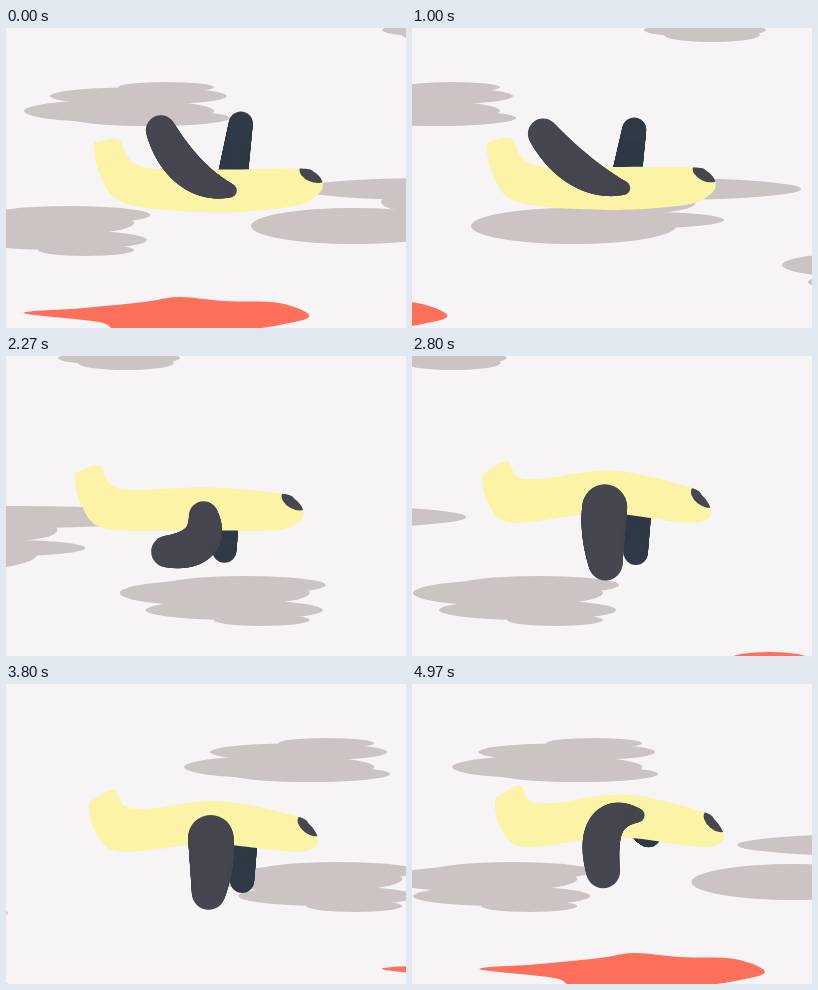
Animation, 400 px wide and 300 px high, one loop 5010 ms. Source, as an HTML page with a canvas:

```html
<!DOCTYPE html>
<html lang="en">
<head>
<meta charset="utf-8">
<title>Flying</title>
<style>
  html, body { margin: 0; width: 100%; height: 100%; overflow: hidden; background: #f6f4f4; }
  canvas { display: block; }
</style>
</head>
<body>
<canvas id="stage" width="400" height="300"></canvas>
<script>
const ctx = document.getElementById('stage').getContext('2d');
const LOOP = 5010, CYCLE = 102.7, FLAP = 10.1, TAU = 2 * Math.PI;
const SKY = '#f6f4f4', CLOUD = '#cbc4c3', RED = '#ff705c';
const YELLOW = '#fbf3a6', DARK = '#45464f', SHADE = '#2f3a46';

// Clouds: streaks of [left, right, middle y, half height]
const layered = [[0, 190, 17, 13], [45, 206, 9, 9], [26, 203, 34, 10], [94, 190, 44, 6]];
const wide = [[0, 205, 198, 18], [90, 253, 192, 8], [46, 330, 161, 11], [130, 225, 174, 11]];
const high = [[0, 122, 2, 7], [20, 116, 7, 7]];
const low = [[0, 80, 303, 7]];
const clouds = [
  { shape: layered, x: 18, y: 98, speed: 6, scaleY: -0.88 },
  { shape: high, x: 376, speed: 7.2 },
  { shape: layered, x: -62, y: 178, speed: 10.05 },
  { shape: wide, x: 245, speed: 9.3 },
  { shape: layered, x: 575, y: 220, speed: 10.25 },
  { shape: low, x: 1415, speed: 19.6, color: RED },
];
const island = [[0, 285], [60, 280], [120, 274], [155, 269], [200, 273], [255, 275],
  [285, 287], [265, 295], [200, 304], [100, 303], [75, 294]];
const bodyOutline = [[70, 120], [76, 115], [95, 113], [105, 132], [128, 142], [200, 143],
  [275, 142], [291, 146], [299, 157], [293, 169], [268, 180], [190, 186], [102, 177], [77, 150]];

const lerp = (a, b, k) => a + (b - a) * k;
const smooth = (from, to, v) => {
  const k = Math.min(1, Math.max(0, (v - from) / (to - from)));
  return k * k * (3 - 2 * k);
};
// Eases up from a to b and back down from c to d
const pulse = (a, b, c, d, v) => smooth(a, b, v) * (1 - smooth(c, d, v));
const bezier = (a, b, c, k) => lerp(lerp(a, b, k), lerp(b, c, k), k);

// Smooth closed shape through the points
function blob(points, color) {
  const n = points.length, at = i => points[(i + n) % n];
  const handle = (i, side) => [0, 1].map(a => at(i)[a] + side * (at(i + 1)[a] - at(i - 1)[a]) / 6);
  ctx.beginPath();
  ctx.moveTo(...points[0]);
  for (let i = 0; i < n; i++) {
    ctx.bezierCurveTo(...handle(i, 1), ...handle(i + 1, -1), ...at(i + 1));
  }
  ctx.fillStyle = color;
  ctx.fill();
}

function ellipse(x, y, rx, ry, color, turn = 0) {
  ctx.beginPath();
  ctx.ellipse(x, y, rx, ry, turn, 0, TAU);
  ctx.fillStyle = color;
  ctx.fill();
}

// Bent limb swept by a circle; each joint is [x, y, radius]
function limb(root, joint, tip, color) {
  for (let k = 0; k <= 1; k += 1 / 64) {
    const [x, y, r] = root.map((v, i) => bezier(v, joint[i], tip[i], k));
    ellipse(x, y, r, r, color);
  }
}

function drift(x, speed, step) {
  const left = x - speed * step;
  return left < -350 ? left + speed * CYCLE : left;
}

function drawCloud({ shape, x, y = 0, speed, scaleY = 1, color = CLOUD }, step) {
  const left = drift(x, speed, step);
  for (const [x1, x2, mid, half] of shape) {
    ellipse(left + (x1 + x2) / 2, y + mid * scaleY, (x2 - x1) / 2, half * Math.abs(scaleY), color);
  }
}

function drawFarWing(phase) {
  const fall = pulse(0, 0.5, 0.6, 1.05, phase);
  const root = [209 + 9 * fall, 149, 15], tip = [217, 97 + 100 * fall, 12];
  limb(root, root.map((v, i) => (v + tip[i]) / 2), tip, SHADE);
}

function drawBody(bend) {
  const arch = x => -30 * bend * Math.sin(Math.PI * (x - 75) / 230);
  ctx.save();
  blob(bodyOutline.map(([x, y]) => [x - 7 * bend, y + arch(x)]), YELLOW);
  ctx.clip();
  ellipse(289 - 5 * bend, 147 + arch(289), 14, 8.5, DARK, 0.4 + 0.3 * bend);
  ctx.restore();
}

// The upper part swings down and up; the outer part follows later
function drawNearWing(phase, bend) {
  const swing = Math.exp(-(((phase - 0.48) / 0.14) ** 2));
  const spread = swing * bend;
  const extend = ([x, y], length, degrees, radius) => {
    const angle = degrees * TAU / 360;
    return [x - length * Math.cos(angle), y + length * Math.sin(angle), radius];
  };
  const root = [206 - 26 * spread, 164 - 30 * bend + 20 * spread, 7 + 20 * spread];
  const joint = extend(root, 46 - 26 * spread, -9 + 115 * swing, 23);
  // Past straight down the outer part points forwards
  const tip = extend(joint, 58 + 6 * bend - 42 * spread, lerp(-66, 104, bend), 15 + 2 * bend);
  limb(root, joint, tip, DARK);
}

function drawBird(step) {
  const phase = step / FLAP % 1;
  const bend = pulse(0.37, 0.57, 0.78, 1.02, phase);
  const sway = 11 + 11 * Math.cos(TAU * (step - 88) / CYCLE);
  const lift = -3.5 * Math.max(0, Math.cos(TAU * (phase - 0.82)));
  ctx.save();
  ctx.translate(sway, lift);
  drawFarWing(phase);
  drawBody(bend);
  drawNearWing(phase, bend);
  ctx.restore();
}

function draw() {
  const t = performance.now() % LOOP;
  // Two pictures per 100 ms: held for 70 ms, then 30 ms
  const step = Math.min(99, 2 * Math.floor(t / 100) + (t % 100 >= 70 ? 1 : 0));
  ctx.fillStyle = SKY;
  ctx.fillRect(0, 0, 400, 300);
  clouds.forEach(cloud => drawCloud(cloud, step));
  const shore = drift(18, 13.4, step);
  blob(island.map(([x, y]) => [x + shore, y]), RED);
  drawBird(step);
  requestAnimationFrame(draw);
}
draw();
</script>
</body>
</html>
```
